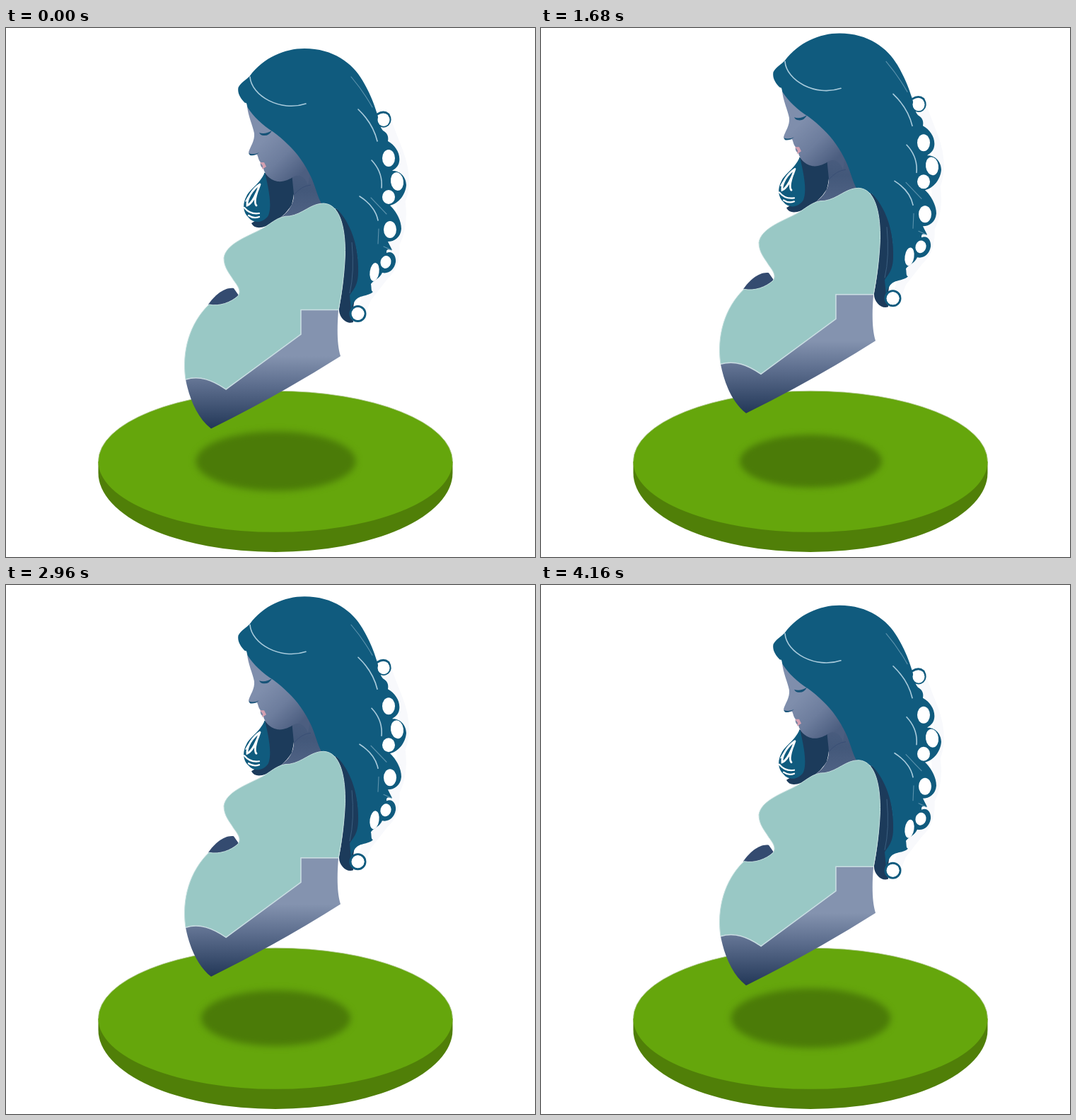
An HTML page that plays this animation: 748 by 748 pixels, repeating every 4.24 s.

```html
<!DOCTYPE html>
<html lang="en">
<head>
<meta charset="utf-8">
<title>Expecting</title>
<style>
  html, body { margin: 0; width: 100%; height: 100%; overflow: hidden; background: #fff; }
  svg { display: block; width: 100vw; height: 100vh; }
  .hair { fill: #105b7e; }
  .dark { fill: #1c3b5b; }
  .curl { fill: none; stroke: #105b7e; stroke-linecap: round; }
  .shine { fill: none; stroke: #a9cbdc; stroke-width: 1.6; stroke-linecap: round; }
  .faint { stroke: #5d93ad; stroke-width: 1.1; }
  .hole { fill: #fff; }
  .seam { fill: none; stroke: #c9dde2; stroke-width: 1.5; }
</style>
</head>
<body>
<svg viewBox="0 0 748 748">
  <defs>
    <linearGradient id="arm" gradientUnits="userSpaceOnUse" x1="0" y1="464" x2="0" y2="566">
      <stop offset="0" stop-color="#8493af"/>
      <stop offset=".4" stop-color="#5d6e8e"/>
      <stop offset="1" stop-color="#233858"/>
    </linearGradient>
    <linearGradient id="face" gradientUnits="userSpaceOnUse" x1="362" y1="160" x2="412" y2="212">
      <stop offset="0" stop-color="#7f8eac"/>
      <stop offset=".5" stop-color="#6d7d9d"/>
      <stop offset="1" stop-color="#4c5e80"/>
    </linearGradient>
    <linearGradient id="neck" gradientUnits="userSpaceOnUse" x1="0" y1="195" x2="0" y2="265">
      <stop offset="0" stop-color="#4c5e80"/>
      <stop offset=".5" stop-color="#43587a"/>
      <stop offset="1" stop-color="#4f6284"/>
    </linearGradient>
    <filter id="soft" x="-20%" y="-30%" width="140%" height="160%" color-interpolation-filters="sRGB">
      <feGaussianBlur stdDeviation="5"/>
    </filter>
  </defs>

  <path fill="#507f08" d="M130.5 613V629A250.5 112 0 0 0 631.5 629V613Z"/>
  <ellipse cx="381" cy="613" rx="250.5" ry="99.8" fill="#65a60c"/>
  <path fill="none" stroke="#b5c99a" stroke-width=".8" d="M130.5 613A250.5 99.8 0 0 1 631.5 613"/>
  <g id="shadow">
    <ellipse rx="113" ry="42" fill="#4b7b08" filter="url(#soft)"/>
  </g>

  <g id="woman">
    <path fill="none" stroke="#f8f9fc" stroke-width="13" stroke-linecap="round"
      d="M536 125Q545 150 555 175Q570 215 558 245Q563 280 550 305Q552 335 535 350L510 382L500 408"/>

    <!-- lock under the chin -->
    <path class="dark" d="M365 205L408 208Q409 232 404 250Q392 270 368 280Q352 286 347 276L370 262Z"/>
    <path class="hair" d="M366 204C370 222 377 250 371 265C364 276 350 277 343 268C335 261 334 249 340 238C346 226 358 222 366 204Z"/>
    <g fill="none" stroke="#fff" stroke-linecap="round">
      <path stroke-width="2.8" d="M359 221C348 228 340 242 341 251C348 248 355 233 359 221C353 236 350 247 354 251"/>
      <path stroke-width="2.2" d="M337 254Q345 264 358 262M343 265Q350 270 358 267"/>
      <path stroke-width="1.5" d="M352 227Q343 237 339 245"/>
    </g>

    <!-- skin -->
    <path fill="url(#neck)" d="M404 205L420 175L450 235L455 252L420 268L388 268Q407 255 407 235Z"/>
    <path fill="url(#face)" d="M341 110C342 124 349 138 351 149C352 160 345 168 343 176C344 180 349 180 355 179C357 183 357 187 360 190C359 194 361 197 364 199C366 206 371 214 384 217C393 218 401 214 407 210C418 205 425 215 427 222L432 190L395 140Z"/>
    <path fill="none" stroke="#384d74" stroke-width=".9" d="M407 236Q418 223 431 222"/>
    <path fill="#d4a0b1" d="M359 190L365 190L368 196L362 200L363 195Z"/>
    <path fill="#175378" d="M343 177Q350 180 358 176Q352 181 345 180ZM358 148Q366 151 376 145Q372 153 364 152Q360 152 358 148Z"/>

    <!-- back strands -->
    <path class="dark" d="M465 254C492 268 500 320 499 352C498 376 489 382 491 416C481 420 470 408 471 397C477 365 484 310 472 270Z"/>

    <!-- main hair -->
    <path class="hair" d="M345 67.5C364 42 394 29.1 422 29.1C463 29.1 490 50 504 74C514 91 520 106 524 119
      C527 126 527 138 533 145C540 149 541 154 540 160C551 166 558 178 556 189C555 196 550 199 546 202
      C557 201 566 211 566 222C565 236 555 248 543 251C549 256 559 270 559 284C558 296 549 302 540 302
      L546 314C538 312 538 314 538 318C547 314 552 323 551 331C549 342 541 348 532 346
      C528 355 520 356 516 362C517 368 516 372 519 373C512 380 500 377 494 385C490 390 488 395 488 400
      L486 378C491 370 498 364 498 345C499 310 488 276 468 256L447 250C440 238 437 222 431 210
      C423 193 412 177 399 165C392 158 385 152 378 147C362 137 350 125 342 113C340 109 341 105 338 106
      C331 99 327 92 328.5 84C333 76 339 74 345 67.5Z"/>
    <path fill="none" stroke="#3b5f80" stroke-width="1" d="M489 303Q493 345 486 375"/>

    <!-- curls -->
    <path class="curl" stroke-width="2.8" d="M525 122Q534 116 541 122Q546 131 540 137Q535 141 529 138"/>
    <g class="hole">
      <ellipse cx="534" cy="130" rx="8.5" ry="9"/>
      <ellipse cx="541" cy="184" rx="9" ry="12"/>
      <ellipse cx="553" cy="217" rx="9" ry="13" transform="rotate(-8 553 217)"/>
      <ellipse cx="541" cy="239" rx="9" ry="10"/>
      <ellipse cx="543" cy="285" rx="9" ry="12"/>
      <ellipse cx="537" cy="331" rx="7.5" ry="9" transform="rotate(15 537 331)"/>
      <ellipse cx="521" cy="345" rx="6.5" ry="13" transform="rotate(8 521 345)"/>
    </g>
    <circle class="curl" cx="497.5" cy="404" r="10.5" stroke-width="3"/>
    <circle class="hole" cx="497.5" cy="404" r="9"/>

    <!-- highlights -->
    <path class="shine" d="M345 69C347 96 388 119 424 107M498 115Q519 135 525 160M517 187Q533 204 531 226M500 238Q522 252 526 272"/>
    <path class="shine faint" d="M488 69Q505 89 518 112M516 240L538 263M527 284L526 305M534 309L545 314"/>

    <!-- far hand, shirt and near arm -->
    <path fill="#344b70" d="M286 391C295 378 309 366 322 368L329 378C318 389 301 395 286 391Z"/>
    <path fill="#99c8c5" stroke="#c3dedd" stroke-width="1" d="M401 266C420 263 431 248 449 248C474 249 480 287 479.5 321C478 354 474 378 470 399L417 399V433L311 511
      C292 498 274 491 254 497C248 457 260 417 287 391C302 394 318 388 328 379C333 372 328 365 322 357
      C316 347 308 339 308 325C311 306 338 296 358 286C373 279 384 265 401 266Z"/>
    <path fill="url(#arm)" d="M417 399H470C468 425 468 448 473 464Q388 518 290 566.5C270 551 259 523 254 497C274 490 292 498 311 511L417 433Z"/>
    <path class="seam" d="M470 398.5H417V433L311 511C292 498 274 491 254 497"/>
  </g>
</svg>
<script>
  const LOOP = 4240, STEP = 80, DELAY = 20, PERIOD = 4000, LIFT = 23.3;
  const woman = document.getElementById('woman');
  const shadow = document.getElementById('shadow');

  function draw() {
    const t = Math.floor((performance.now() % LOOP) / STEP) * STEP;
    const phase = Math.max(0, t - DELAY) / PERIOD;
    const rise = (1 - Math.cos(phase * 2 * Math.PI)) / 2;
    woman.setAttribute('transform', `translate(0 ${-LIFT * rise})`);
    shadow.setAttribute('transform', `translate(381.5 612.5) scale(${1 - 0.12 * rise})`);
    requestAnimationFrame(draw);
  }
  draw();
</script>
</body>
</html>
```
